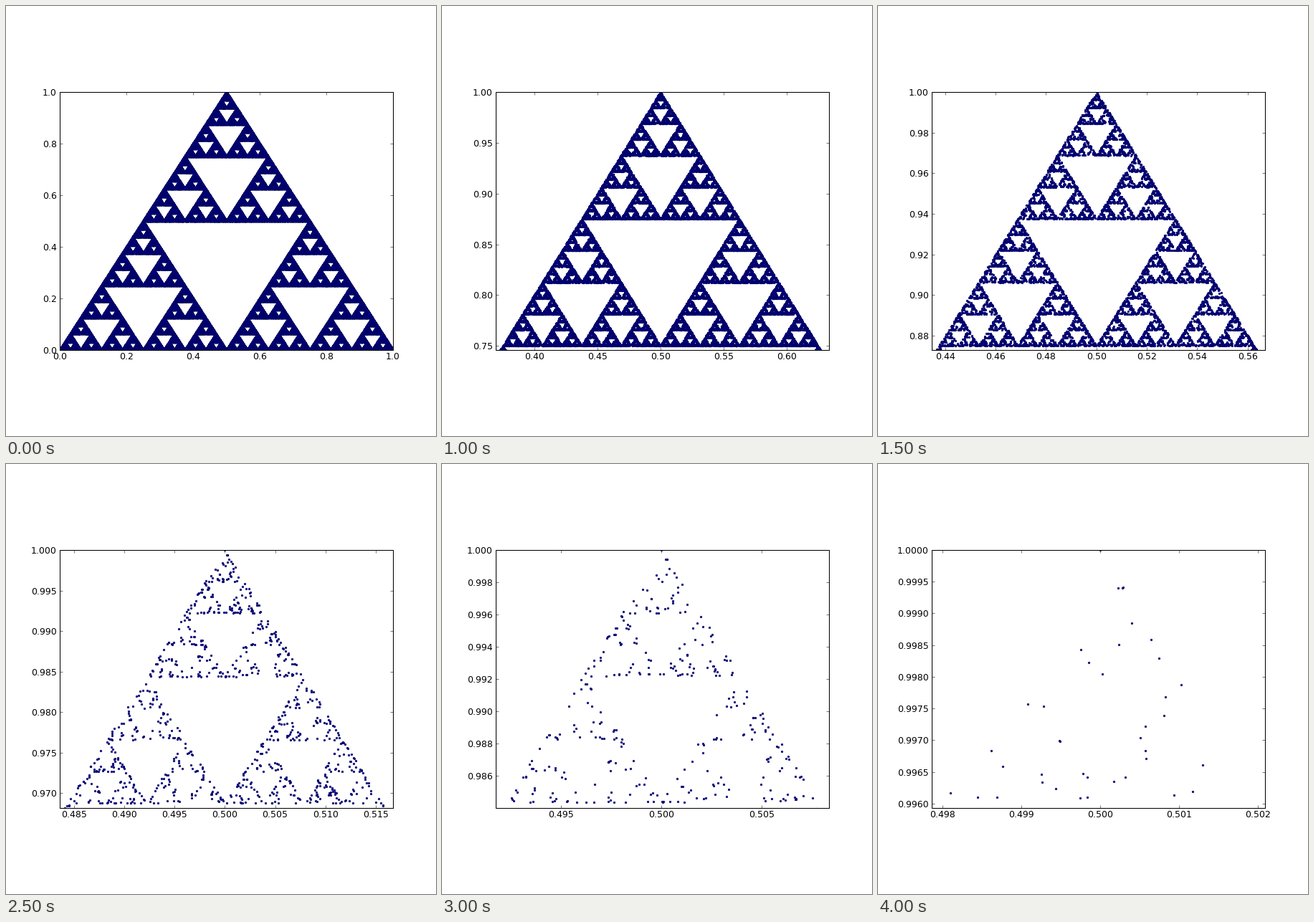
Animation, 600 px wide and 600 px high, one loop 4500 ms. Source, as a matplotlib script:

```python
import math

import matplotlib.pyplot as plt
import numpy as np
from matplotlib.animation import FuncAnimation

plt.rcParams["font.family"] = "DejaVu Sans"

COUNT = 220_000
DEPTH = 22
ZOOMS = 9
SLACK = 1e-4


def sierpinski():
    """Random points of the gasket, plus its apex."""
    rng = np.random.default_rng(12)
    corners = np.array([(0.0, 0.0), (0.5, 1.0), (1.0, 0.0)])
    pts = np.zeros((COUNT, 2))
    for _ in range(DEPTH):
        pts = (pts + corners[rng.integers(0, 3, COUNT)]) / 2
    return np.vstack([pts, corners[1]])


def view(i):
    """Left, right and bottom limits; every step halves the span."""
    if i == 0:
        return 0.0, 1.0, 0.0
    span = 0.5 ** i
    left = 0.5 - 0.522 * span - SLACK
    right = 0.5 + 0.535 * span
    bottom = 1 - 1.016 * span - SLACK
    return left, right, bottom


def nice_step(lo, hi, bins=9):
    """Smallest 1-2-5 step whose bins, counted from below lo, reach hi."""
    scale = 10.0 ** math.floor(math.log10((hi - lo) / bins))
    for factor in (1, 2, 5, 10):
        step = factor * scale
        if math.floor(lo / step + 1e-9) + bins >= hi / step - 1e-6:
            return step
    return 20 * scale


def set_ticks(axis, lo, hi):
    step = nice_step(lo, hi)
    first = math.ceil(lo / step - 1e-9)
    last = math.floor(hi / step + 1e-9)
    ticks = np.arange(first, last + 1) * step
    digits = math.ceil(-math.log10(step) - 1e-9)
    axis.set_ticks(ticks, [f"{t:.{digits}f}" for t in ticks])


points = sierpinski()

fig = plt.figure(figsize=(8, 8), dpi=75, facecolor="white")
ax = fig.add_axes([0.125, 0.2, 0.775, 0.6])
ax.tick_params(direction="in", length=4, width=0.5, pad=4, labelsize=12,
               top=True, right=True)
ax.tick_params(axis="x", pad=3.2)
for spine in ax.spines.values():
    spine.set_linewidth(1.0)

dots, = ax.plot([], [], "o", ms=2.6, mfc="#00009c", mec="#000050", mew=0.5)


def draw(i):
    left, right, bottom = view(i)
    margin = (1 - bottom) * 0.02
    seen = points[points[:, 1] > bottom - margin]
    dots.set_data(seen[:, 0], seen[:, 1])
    set_ticks(ax.xaxis, left, right)
    set_ticks(ax.yaxis, bottom, 1.0)
    ax.set_xlim(left, right)
    ax.set_ylim(bottom, 1.0)
    return dots,


anim = FuncAnimation(fig, draw, frames=ZOOMS, interval=500,
                     repeat=True, repeat_delay=0, blit=False)

plt.show()
```
